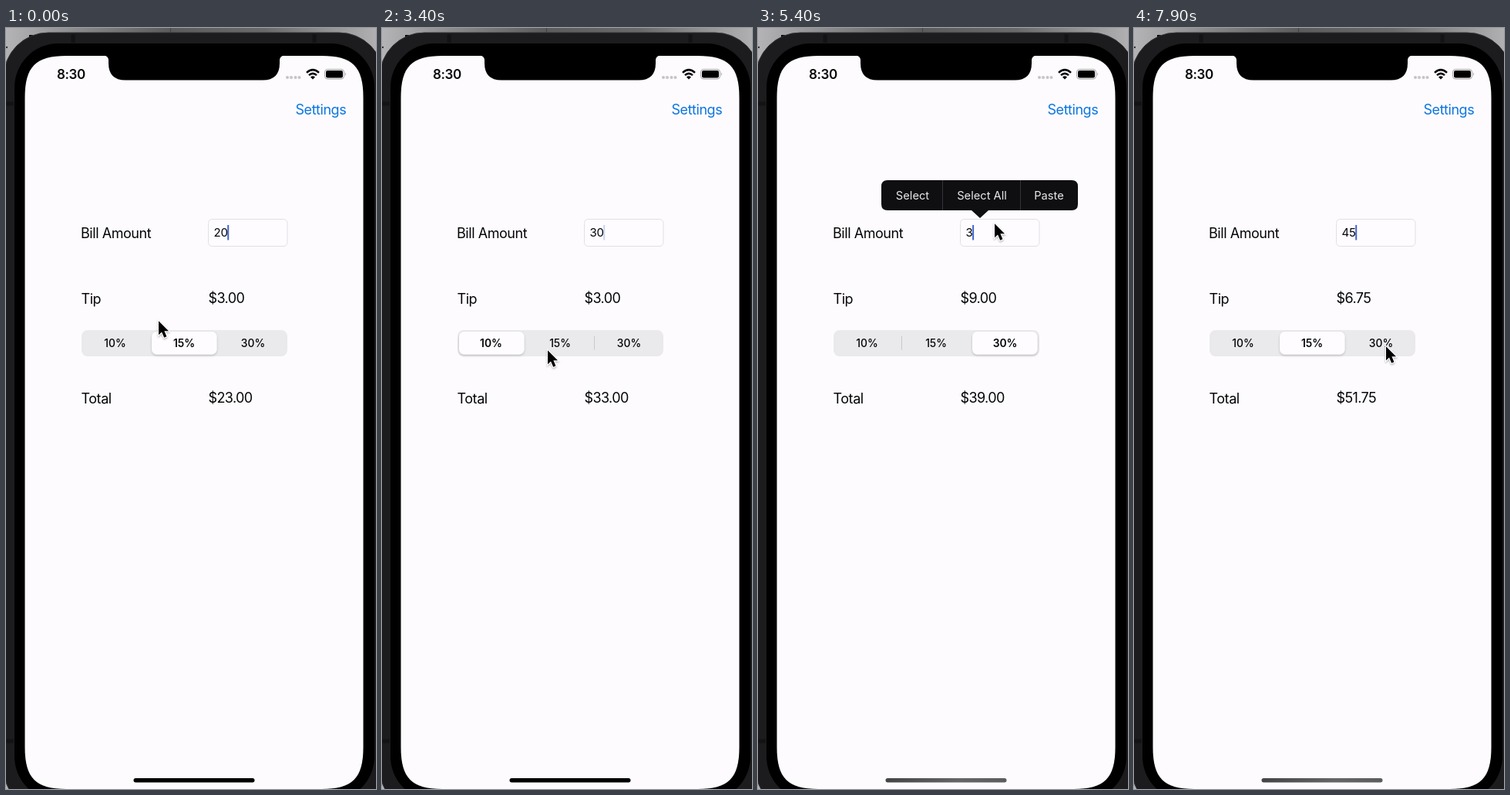
An HTML page that plays this animation: 480 by 985 pixels, repeating every 8000 ms.

```html
<!DOCTYPE html>
<html lang="en">
<head>
<meta charset="utf-8">
<title>Tip calculator</title>
<style>
  html, body { margin: 0; width: 100%; height: 100%; overflow: hidden; background: #000; }
  svg { display: block; width: 480px; height: 985px; }
  text { font: 18px Inter, "Open Sans", sans-serif; letter-spacing: -.45px; fill: #050506; }
  .money { letter-spacing: -.6px; }
  .seg text { font-size: 13.8px; font-weight: 500; letter-spacing: 0; text-anchor: middle; }
  .menu text { font-size: 14.7px; letter-spacing: 0; text-anchor: middle; fill: #e9e8eb; }
</style>
</head>
<body>
<svg viewBox="0 0 480 985">
  <defs>
    <linearGradient id="desk">
      <stop offset="0" stop-color="#b4b3b5"/><stop offset=".2" stop-color="#89888a"/>
      <stop offset=".44" stop-color="#5c5b5d"/><stop offset=".7" stop-color="#6a696b"/>
      <stop offset="1" stop-color="#b0afb1"/>
    </linearGradient>
    <linearGradient id="bar">
      <stop offset="0" stop-color="#444446"/><stop offset=".6" stop-color="#656567"/>
      <stop offset="1" stop-color="#5c5c5e"/>
    </linearGradient>
    <filter id="soft" x="-20%" y="-30%" width="140%" height="170%">
      <feDropShadow dx="0" dy="1.5" stdDeviation="1.6" flood-opacity=".2"/>
    </filter>
    <filter id="drop" x="-50%" y="-50%" width="200%" height="200%">
      <feDropShadow dx="0" dy="1.5" stdDeviation="1.3" flood-opacity=".35"/>
    </filter>
  </defs>

  <!-- Desktop and phone body -->
  <rect width="480" height="985" fill="url(#desk)"/>
  <path d="M213.5 0v7" stroke="#444"/>
  <rect x="30" y="9" width="20" height="20"/>
  <circle cx="1" cy="25" r="1.2" fill="#333"/>
  <rect x="-3" y="6" width="493" height="1010" rx="58" fill="#1c1b1e" stroke="#343336"/>
  <path d="M87 8v11M400 8v11M0 98h10M0 923h10" stroke="#131315" stroke-width="5"/>
  <rect x="11" y="20" width="467" height="980" rx="57"/>
  <path d="M24.500 90c0-40 14-54 54-54h331c40 0 54 14 54 54v841c0 40-14 54-54 54h-331c-40 0-54-14-54-54z" fill="#fdfbfe"/>
  <path d="M127 35.500q6 .5 6 7v3q0 22 22 22h178q22 0 22-22v-3q0-6.500 6-7z"/>

  <!-- Status bar -->
  <text x="66" y="66" style="font-size:17px;font-weight:600;letter-spacing:-.4px">8:30</text>
  <g fill="#c5c4c7">
    <circle cx="365" cy="64" r="2"/><circle cx="370" cy="64" r="2"/>
    <circle cx="375.500" cy="64" r="2"/><circle cx="380.500" cy="64" r="2"/>
  </g>
  <g fill="none" stroke="#050506" stroke-width="2.500">
    <path d="M390 57.800q8-7.400 16 0M393 61.200q5-4.600 10 0"/>
  </g>
  <path d="M395 63.500q3-2.400 6 0l-3 3z"/>
  <rect x="413.500" y="53.500" width="25" height="12.500" rx="3.600" fill="none" stroke="#a3a2a5"/>
  <rect x="415" y="55" width="22" height="9.500" rx="2.200"/>
  <path d="M440 57.500q2 2.200 0 4.500z" fill="#a3a2a5"/>

  <!-- Form -->
  <text x="375.500" y="112" style="fill:#0b76e0">Settings</text>
  <text x="97" y="272">Bill Amount</text>
  <text x="97.500" y="357">Tip</text>
  <text x="97.500" y="486">Total</text>
  <rect x="262.500" y="247.500" width="102.500" height="35" rx="5" fill="#fefcff" stroke="#e1e0e3"/>
  <text id="bill" x="269.500" y="270" style="font-size:15px;letter-spacing:-.15px"></text>
  <rect id="caret" y="255" width="2" height="19.500" fill="#3f68cf"/>
  <text id="tip" class="money" x="262.500" y="355.500"></text>
  <text id="total" class="money" x="262.500" y="485"></text>

  <g class="seg">
    <rect x="98" y="391" width="267" height="34" rx="8" fill="#eae9eb"/>
    <path id="div0" d="M186.500 398.500v18" stroke="#c9c8cb"/>
    <path id="div1" d="M275.500 398.500v18" stroke="#c9c8cb"/>
    <rect id="thumb" y="393" width="84.500" height="29.500" rx="6.500" fill="#fefcff" filter="url(#soft)"/>
    <text x="141.500" y="413">10%</text>
    <text x="231" y="413">15%</text>
    <text x="320.500" y="413">30%</text>
  </g>

  <rect id="home" x="165.500" y="971" width="157" height="5.500" rx="2.750"/>

  <g id="menu" class="menu">
    <path d="M168 197h239q8 0 8 8v23q0 8-8 8H299l-11 10-11-10H168q-8 0-8-8v-23q0-8 8-8z" fill="#0f0e11"/>
    <path d="M239.500 197v39M340.500 197v39" stroke="#343337"/>
    <text x="200.500" y="222">Select</text>
    <text x="290.500" y="222">Select All</text>
    <text x="377.500" y="222">Paste</text>
  </g>

  <path id="pointer" d="M0 1.500V23L4.800 18.500 8.600 27 12.400 25.300 8.800 17.100H15.500Z"
    stroke="#fff" stroke-width="2.400" paint-order="stroke" filter="url(#drop)"/>
</svg>
<script>
const $ = id => document.getElementById(id);
const clamp = v => Math.max(0, Math.min(1, v));
const smooth = p => p * p * (3 - 2 * p);
const labels = document.querySelectorAll('.seg text');
const slots = [100, 189, 278];
const rates = [.1, .15, .3];

// [time, value]
const typing = [[0, '20'], [1000, '2'], [1200, ''], [1500, '3'], [1700, '30'],
  [5300, '3'], [5500, ''], [5800, '4'], [6000, '45']];
// [time, segment, bill]
const taps = [[-1000, 1, 20], [2850, 0, 30], [3550, 1, 30], [4085, 2, 30],
  [6725, 0, 45], [7350, 1, 45]];
// [time, x, y]
const path = [[0, 198, 378], [300, 191, 380], [900, 188, 325], [1300, 165, 312],
  [1800, 149, 322], [2300, 213, 370], [2600, 134, 410], [2900, 140, 410],
  [3400, 215, 416], [3750, 222, 410], [4050, 298, 405], [4300, 300, 404],
  [4850, 307, 264], [5400, 307, 252], [6000, 307, 256], [6300, 290, 316],
  [6600, 148, 411], [6750, 148, 412], [7100, 207, 425], [7300, 228, 413],
  [7450, 230, 412], [7900, 327, 411]];

const lastIndex = (list, t) => list.findLastIndex(k => k[0] <= t);

function pointerAt(t) {
  const i = lastIndex(path, t), a = path[i], b = path[i + 1] || a;
  const p = smooth((t - a[0]) / (b[0] - a[0] || 1));
  return [a[1] + (b[1] - a[1]) * p, a[2] + (b[2] - a[2]) * p];
}

function caretAlpha(t) {
  if ((t > 900 && t < 2000) || (t > 5100 && t < 6400)) return 1;
  const phase = t % 1000;
  return clamp((Math.abs(phase - 500) - 70) / 110);
}

function draw(t) {
  const text = typing[lastIndex(typing, t)][1];
  $('bill').textContent = text;
  $('caret').setAttribute('x', 269 + 9.1 * text.length);
  // The caret stays lit half a second into each blink, and while typing.
  $('caret').setAttribute('opacity', t < 500 ? 1 : caretAlpha(t));

  const n = lastIndex(taps, t), [start, seg, bill] = taps[n];
  const from = slots[taps[Math.max(0, n - 1)][1]];
  const p = smooth(clamp((t - start) / 400));
  const x = from + (slots[seg] - from) * p;
  $('thumb').setAttribute('x', x);
  $('div0').setAttribute('opacity', clamp((x - 189) / 89));
  $('div1').setAttribute('opacity', clamp((189 - x) / 89));
  labels.forEach((label, i) => label.style.fontWeight = i === seg && p > .7 ? 600 : 500);

  const tip = bill * rates[seg];
  $('tip').textContent = '$' + tip.toFixed(2);
  $('total').textContent = '$' + (bill + tip).toFixed(2);

  $('menu').setAttribute('opacity', Math.min(clamp((t - 4900) / 200), clamp((5700 - t) / 200)));
  $('home').setAttribute('fill', t < 5000 ? '#000' : 'url(#bar)');
  $('pointer').setAttribute('transform', `translate(${pointerAt(t)}) scale(.84)`);
}

function tick() {
  // The screen updates ten times a second.
  draw(Math.floor(performance.now() % 8000 / 100) * 100);
  requestAnimationFrame(tick);
}
tick();
</script>
</body>
</html>
```
